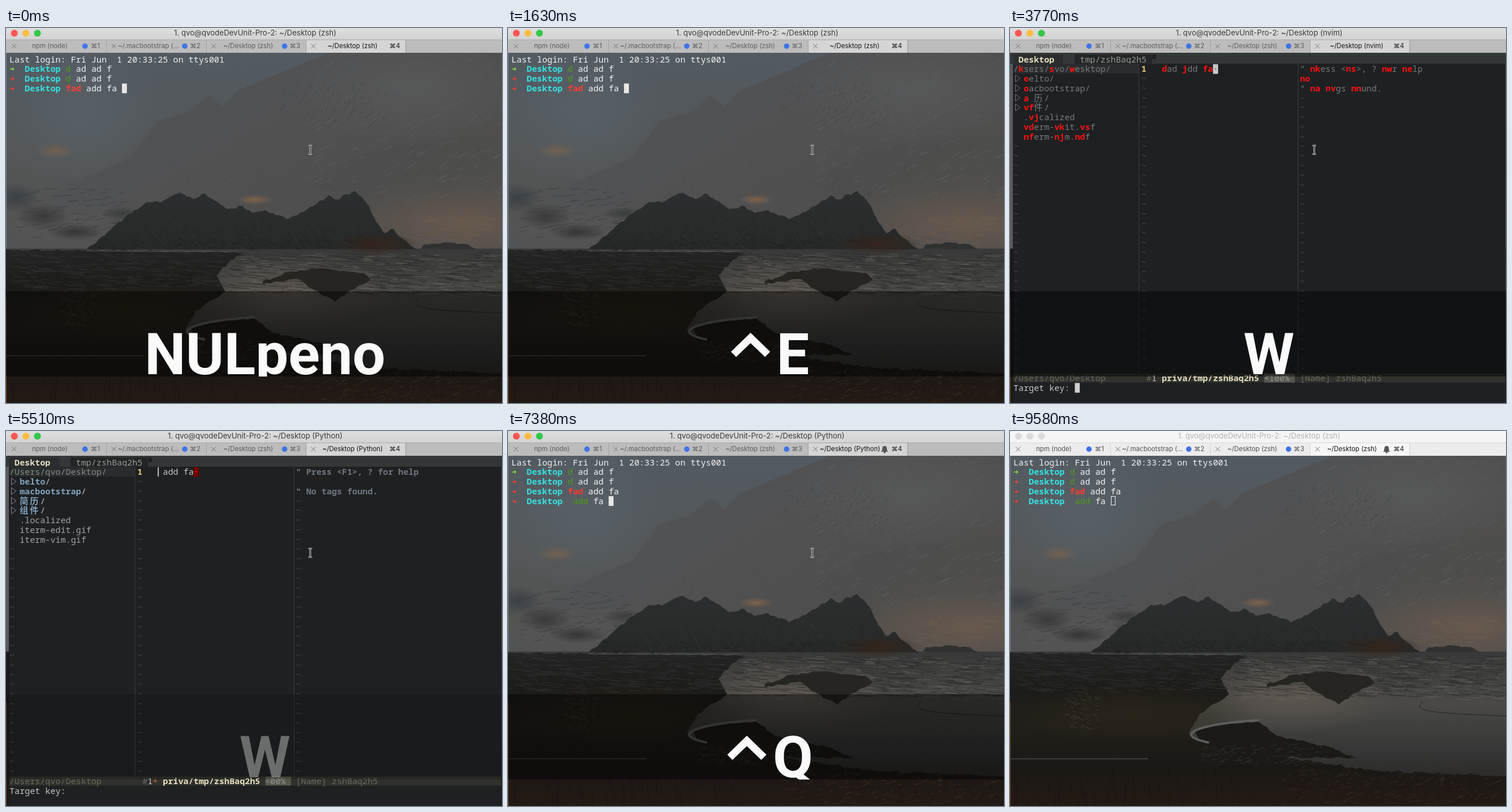
These frames come from a looping animation (860x651 px, 9.68 s). An HTML page with a canvas:

```html
<!DOCTYPE html>
<html lang="en">
<head>
<meta charset="utf-8">
<title>Terminal session</title>
<style>
html, body { margin: 0; height: 100%; overflow: hidden; background: #1e2022; }
canvas { display: block; }
</style>
</head>
<body>
<canvas id="stage" width="860" height="651"></canvas>
<script>
const W = 860, H = 651, LOOP = 9680, CELL = 8.87, ROW = 16.77;
const MONO = '"Noto Sans Mono","Noto Sans CJK SC","DejaVu Sans Mono",monospace';
const UI = 'Inter,"DejaVu Sans",sans-serif';
const USER = 'qvo', HOST = USER + 'deDevUnit-Pro-2';
const g = document.getElementById('stage').getContext('2d');

// Colour codes used after § in terminal strings; capitals are bold.
const INK = {
  w: '#f2f2f2', C: '#34e2e2', g: '#4e9a1a', G: '#8ae234', R: '#ff3b30', E: '#ff1010',
  d: '#777b7b', D: '#707880', B: '#81a2be', f: '#a2a6a4', t: '#c5c8c6', m: '#434649',
  Y: '#f0c674', s: '#6a6a60', S: '#e4dfc0', p: '#888c88', o: '#e06c4c', n: '#969a94'
};
const colX = c => 6 + c * CELL, rowY = r => 54.5 + r * ROW;

function box(x, y, w, h, color, ctx = g) {
  ctx.fillStyle = color;
  ctx.fillRect(x, y, w, h);
}
function cells(col, row, count, color) {
  box(colX(col), rowY(row) - 8.4, count * CELL, 16.8, color);
}
function label(str, x, y, size, color, weight = 400, align = 'center') {
  g.font = `${weight} ${size}px ${UI}`;
  g.textAlign = align;
  g.textBaseline = 'middle';
  g.fillStyle = color;
  g.fillText(str, x, y);
}
function term(col, row, str) {
  g.textAlign = 'left';
  g.textBaseline = 'alphabetic';
  for (const part of str.split('§').slice(1)) {
    const code = part[0], bold = code < 'a';
    g.fillStyle = INK[code];
    g.font = `${bold ? 700 : 500} 14.78px ${MONO}`;
    for (const ch of part.slice(1)) {
      g.fillText(ch, colX(col), rowY(row) + 5);
      col += ch > '\u2fff' ? 2 : 1;
    }
  }
}

function paintScenery() {
  const canvas = document.createElement('canvas');
  canvas.width = W; canvas.height = H;
  const c = canvas.getContext('2d');
  let seed = 7;
  const rnd = () => (seed = (seed * 16807) % 2147483647) / 2147483647;

  const gradient = (x0, y0, x1, y1, ...stops) => {
    const lg = c.createLinearGradient(x0, y0, x1, y1);
    stops.forEach((s, i) => lg.addColorStop(i / (stops.length - 1), s));
    return lg;
  };
  const land = (pts, fill, rough = 3) => {
    c.fillStyle = fill;
    c.beginPath();
    for (let i = 0; i < pts.length - 2; i += 2) {
      const [x, y, u, v] = pts.slice(i, i + 4), n = Math.ceil(Math.hypot(u - x, v - y) / 7);
      for (let k = 0; k < n; k++)
        c.lineTo(x + (u - x) * k / n, y + (v - y) * k / n + (k ? (rnd() - .5) * rough : 0));
    }
    c.lineTo(...pts.slice(-2));
    c.fill();
  };
  const glow = (x, y, rx, ry, color) => {
    c.save();
    c.translate(x, y);
    c.scale(rx, ry);
    const rg = c.createRadialGradient(0, 0, 0, 0, 0, 1);
    rg.addColorStop(0, color);
    rg.addColorStop(1, color.slice(0, 7) + '00');
    c.fillStyle = rg;
    c.fillRect(-1, -1, 2, 2);
    c.restore();
  };
  const flecks = (n, x, y, w, h, len, slope, color) => {
    c.strokeStyle = color;
    c.lineWidth = 1.2;
    c.beginPath();
    while (n--) {
      const px = x + rnd() * w, py = y + rnd() * h, l = len * (.3 + rnd());
      c.moveTo(px, py);
      c.lineTo(px + l, py + l * slope);
    }
    c.stroke();
  };

  box(0, 0, W, H, gradient(0, 43, 0, 390, '#535b61', '#545657', '#504f4d'), c);
  glow(130, 150, 150, 130, '#5a656d99');
  land([0, 345, 60, 305, 110, 270, 215, 225, 262, 162, 312, 148, 352, 117, 375, 136, 402, 108,
        480, 76, 560, 43, 860, 43, 860, 385, 0, 385], gradient(300, 60, 500, 380, '#505355', '#515152', '#4f4e4d'));
  glow(90, 345, 150, 50, '#5c5a5880');
  glow(700, 110, 220, 90, '#5b5d5e90');
  glow(800, 340, 210, 65, '#68594d');
  land([520, 270, 620, 215, 740, 192, 860, 183, 860, 250, 720, 262, 600, 300], '#4c4c4d90');
  flecks(110, 470, 100, 190, 75, 4, -1.3, '#414446a0');
  flecks(160, 520, 60, 340, 250, 14, -.55, '#5e6060a0');
  flecks(60, 280, 235, 170, 60, 4, -1.5, '#46494b90');
  flecks(70, 700, 320, 160, 55, 12, .08, '#70604f90');
  glow(85, 213, 35, 13, '#72604f');
  glow(430, 298, 30, 9, '#80634a');
  glow(18, 295, 40, 26, '#3b4045');
  glow(65, 327, 48, 24, '#3a3a39');
  glow(120, 354, 50, 15, '#343534');
  glow(200, 322, 36, 12, '#3b3c3c');
  flecks(100, 15, 280, 200, 85, 15, -.15, '#3a3c3ca0');

  // Sea and shore
  box(0, 383, W, H - 383, gradient(0, 383, 0, H, '#383938', '#4a4946', '#343534', '#231d19'), c);
  glow(490, 460, 180, 65, '#5d5650');
  flecks(300, 380, 390, 480, 70, 28, .08, '#25262690');
  flecks(160, 400, 392, 460, 75, 24, .05, '#65635ea0');
  land([720, 383, 725, 375, 765, 372, 795, 375, 820, 384], '#303131');
  land([140, 384, 166, 362, 206, 329, 245, 302, 267, 303, 303, 286, 325, 297, 345, 288, 382, 314,
        410, 309, 427, 321, 450, 316, 487, 332, 522, 315, 560, 290, 573, 298, 605, 283, 626, 305,
        645, 340, 656, 356, 672, 349, 685, 364, 712, 384], gradient(0, 285, 0, 385, '#2c2e2f', '#262828'), 5);
  flecks(150, 225, 325, 400, 55, 9, 1.1, '#35383980');
  glow(640, 375, 75, 20, '#34251c');
  flecks(110, 160, 365, 480, 18, 8, .4, '#1d1f1fa0');
  land([0, 385, 180, 386, 410, 389, 385, 408, 365, 430, 380, 457, 330, 490, 310, 525, 360, 548,
        500, 570, 640, 590, 860, 600, 860, 651, 0, 651],
    gradient(0, 385, 0, 651, '#232423', '#1c1c1a', '#211f1a', '#1a1815', '#241a15'), 5);
  flecks(260, 0, 388, 370, 65, 22, .07, '#34363690');
  glow(210, 490, 230, 52, '#302818a0');
  land([445, 440, 490, 423, 550, 417, 620, 425, 632, 437, 598, 455, 570, 475, 535, 455, 505, 435, 445, 445], '#262522', 4);
  land([320, 520, 350, 510, 430, 504, 465, 530, 560, 550, 600, 568, 400, 565, 330, 540], '#1b1a18', 4);
  c.strokeStyle = '#5d5e5b';
  c.lineWidth = 4;
  c.beginPath();
  c.moveTo(345, 541);
  c.bezierCurveTo(270, 525, 345, 507, 432, 502);
  c.stroke();
  c.lineWidth = 1;
  c.beginPath();
  c.moveTo(140, 387); c.lineTo(400, 388);
  c.moveTo(0, 569); c.lineTo(240, 569);
  c.stroke();
  c.strokeStyle = '#242523';
  c.beginPath();
  c.moveTo(860, 495);
  c.bezierCurveTo(760, 490, 690, 490, 716, 470);
  c.stroke();
  flecks(60, 90, 455, 60, 60, 8, .5, '#4a474070');
  flecks(120, 330, 545, 220, 35, 8, -.3, '#35383990');
  flecks(240, 470, 570, 390, 80, 8, -.4, '#40352c80');
  flecks(60, 0, 575, 400, 70, 2, 16, '#171310a0');
  box(0, 43, 1, 340, '#6f7c84', c);
  box(0, 470, 1, 181, '#804018', c);
  return canvas;
}
const scenery = paintScenery();

function drawChrome(t) {
  const idle = t >= 9580, bell = t >= 7380;
  const app = t < 2280 || t >= 7950 ? 'zsh' : t < 5160 ? 'nvim' : 'Python';
  const dim = idle ? '#505050' : '#5d5d5d';
  const bar = g.createLinearGradient(0, 0, 0, 20);
  bar.addColorStop(0, idle ? '#f7f7f7' : '#dedede');
  bar.addColorStop(1, idle ? '#f4f4f4' : '#d2d2d2');
  box(0, 0, W, 20, bar);
  ['#fc5753', '#fdbc40', '#33c748'].forEach((color, i) => dot(14.5 + 20 * i, 9, 6, idle ? '#dcdcdc' : color));
  label(`1. ${USER}@${HOST}: ~/Desktop (${app})`, 432, 9.5, 13, idle ? '#b4b4b4' : '#3a3a3a');

  box(0, 20, W, 23, idle ? '#ececec' : '#bcbcbc');
  box(520, 20, 172, 23, idle ? '#f6f6f6' : '#d5d5d5');
  box(0, 20, W, 1, idle ? '#d8d8d8' : '#a9a9a9');
  const names = ['npm (node)', '~/.macbootstrap (…', '~/Desktop (zsh)', `~/Desktop (${app})`];
  const centers = [76, 247, 420, bell ? 593 : 601];
  names.forEach((name, i) => {
    const x = 173 * i, active = i === 3, color = active ? '#151515' : dim;
    box(x + 174, 21, 1, 22, idle ? '#d4d4d4' : '#a2a2a2');
    g.strokeStyle = '#707070';
    g.lineWidth = 1;
    g.beginPath();
    g.moveTo(x + 10, 27.5); g.lineTo(x + 18, 35.5);
    g.moveTo(x + 18, 27.5); g.lineTo(x + 10, 35.5);
    g.stroke();
    label(name, centers[i], 32, 11.3, color);
    label('⌘' + (i + 1), x + 155, 32, 11.3, color);
    if (!active) dot(x + 137, 31.5, 4.7, '#3f73e6');
  });
  if (bell) {
    g.fillStyle = '#555';
    g.beginPath();
    g.moveTo(647, 36);
    g.bezierCurveTo(651, 32, 647, 26, 653, 26);
    g.bezierCurveTo(659, 26, 655, 32, 659, 36);
    g.fill();
    dot(653, 37, 1.8, '#555');
  }
}
function dot(x, y, r, color) {
  g.fillStyle = color;
  g.beginPath();
  g.arc(x, y, r, 0, 7);
  g.fill();
}

function drawShell(t) {
  g.drawImage(scenery, 0, 0);
  term(0, 0, '§wLast login: Fri Jun  1 20:33:25 on ttys001');
  term(0, 1, '§G➜  §CDesktop §gd §wad ad f');
  term(0, 2, '§R➜  §CDesktop §gd §wad ad f');
  term(0, 3, '§R➜  §CDesktop §Rfad §wadd fa');
  const back = t >= 7380;
  if (back) term(0, 4, '§R➜  §CDesktop  §gadd §wfa');
  if (t >= 9580) {
    g.strokeStyle = '#f2f2f2';
    g.lineWidth = 1;
    g.strokeRect(175.5, 113.5, 7, 15);
  } else cells(back ? 19 : 22, back ? 4 : 3, .95, '#e8e8e8');
}

function drawEditor(t) {
  const picking = t >= 3680 && t < 4510, cut = t >= 4980;
  const inserting = cut && t < 5900, dirty = t >= 5240 && t < 6550;
  g.drawImage(scenery, 0, 0);
  box(0, 62, 6, 320, '#585a5a');
  box(5, 62, W - 6, 589, '#1e2022');
  box(1, 383, 5, 268, '#1b1a18');
  box(0, 43, W, 19, '#343737');
  if (t < 1960) {
    box(5, 43, W - 6, 19, '#1e2022');
    return;
  }
  box(6, 46, 86, 16, '#2b2d2e');
  box(112, 46, 134, 16, '#232526');
  box(247, 46, 6, 8, '#1e2022');
  term(1, 0, '§SDesktop');
  term(13, 0, '§ntmp/zshBaq2h5');

  // File tree
  box(6, 62, 217, 17, '#2a2d2e');
  const tree = picking
    ? ['§Ee§delto/', '§Eo§dacbootstrap/', '§Ea§d 历/', '§Evf§d件/', '§d.§Evj§dcalized',
       '§Evd§derm-§Evk§dit.§Evs§df', '§Enf§derm-§Enj§dm.§End§df']
    : ['§Bbelto§t/', '§Bmacbootstrap§t/', '§B简历§t/', '§B组件§t/',
       '§f.localized', '§fiterm-edit.gif', '§fiterm-vim.gif'];
  term(0, 1, picking ? '§d/§Ek§dsers/§Es§dvo/§Ew§desktop/' : `§p/Users/${USER}/Desktop/`);
  tree.forEach((line, i) => {
    term(2, i + 2, line);
    if (i > 3) return;
    const y = rowY(i + 2) - .5;
    g.strokeStyle = picking ? '#777' : '#9a7f9f';
    g.lineWidth = 1;
    g.beginPath();
    g.moveTo(9.5, y - 6); g.lineTo(17.5, y); g.lineTo(9.5, y + 6);
    g.closePath();
    g.stroke();
  });
  for (let r = 2; r < 33; r++) {
    if (r > 8) term(0, r, '§m~');
    term(25, r, '§m~');
    if (r > 3 && t >= 2140) term(56, r, '§m~');
  }
  box(223, 62, 1, 538, '#3a3d3f');
  box(499, 62, 1, 538, '#3a3d3f');

  // Buffer
  if (!picking && !inserting) cells(26, 1, 29, '#2a2c2d');
  term(25, 1, '§Y1');
  const cursor = t < 4510 ? 39 : 29, tail = cut ? 36 : 39;
  if (cursor !== tail) cells(tail, 1, 1, '#7a0000');
  if (inserting) box(colX(29), 63, 1.5, 16, '#eee');
  else cells(cursor, 1, 1, '#c5c8c6');
  term(29, 1, picking ? '§Ed§dad §Ej§ddd §Efa' : cut ? '§t add fa' : '§tfad add fa');
  term(tail, 1, cursor === tail ? '§m·' : '§E·');

  // Tag list
  if (t >= 2140) {
    const tags = picking
      ? ['§d" §Enk§dess <§Ens§d>, ? §Enw§dr §Ene§dlp', '§Eno', '§d" §Ena§d §Env§dgs §Enn§dund.']
      : ['§D" Press <F1>, ? for help', '§D', '§D" No tags found.'];
    tags.forEach((line, i) => term(56, i + 1, line));
  }

  // Status and command lines
  box(6, 600, W - 7, 15.5, '#30312c');
  term(0, 33, `§s/Users/${USER}/Desktop`);
  term(26, 33, dirty ? '§s#§t1§o+' : '§s#§t1');
  const shift = dirty ? 1 : 0;
  box(colX(49 + shift), 600, 494 - colX(49 + shift), 15.5, '#55564c');
  term(29 + shift, 33, '§Spriva/tmp/zshBaq2h5');
  term(49 + shift, 33, dirty ? '§n<00%' : '§n<100%');
  if (t >= 3120) term(56, 33, '§s[Name] zshBaq2h5');
  if (t >= 6550) term(0, 34, '§t"/private/tmp/zshBaq2h5" 1L, 9C [w]');
  else if (t >= 3680) term(0, 34, '§tTarget key:');
  if (picking) cells(12, 34, .95, '#d0d0d0');
}

// [start, keys, strength]
const FADED = .37;
const captions = [
  [0, 'NULpeno', 1], [420, 'NULpeno', FADED], [530, ''],
  [1220, '^', FADED], [1310, '^', 1], [1400, '^X', 1], [1490, '^', 1], [1630, '^E', 1],
  [2490, '^', 1], [2580, '^', FADED], [2670, ''],
  [3590, 'W', FADED], [3680, 'W', 1], [4160, 'W', FADED], [4250, ''],
  [4420, 'D', FADED], [4510, 'D', 1], [4810, 'C', 1], [4980, 'W', 1], [5510, 'W', FADED], [5600, ''],
  [5810, '⎋', FADED], [5900, '⎋', 1], [6160, '^', 1], [6400, '^S', 1], [6850, '^', 1],
  [7300, '^Q', 1], [7710, '^', 1], [7950, '^', FADED], [8040, '']
];
function drawCaption(t) {
  const [, keys, strength] = captions.findLast(c => c[0] <= t);
  if (!keys) return;
  g.save();
  g.beginPath();
  g.rect(0, 457, W, 148);
  g.clip();
  box(0, 457, W, 148, `rgba(0,0,0,${.45 * strength})`);
  g.globalAlpha = strength;
  g.font = '700 101px Roboto,"DejaVu Sans",sans-serif';
  g.textAlign = 'left';
  g.textBaseline = 'alphabetic';
  g.fillStyle = '#fafafa';
  const control = keys[0] === '^', text = control ? keys.slice(1) : keys, lead = control ? 90 : 0;
  const x = 449 - (lead + g.measureText(text).width) / 2;
  g.fillText(text, x + lead, 601);
  if (control) {
    g.translate(x + 45, 529);
    g.fill(new Path2D('M0 0L34 33L25 42L0 18L-25 42L-34 33Z'));
  }
  g.restore();
}

function drawPointer(t) {
  if (t >= 8930 && t < 9210) {
    const k = Math.floor((t - 8930) / 70);
    g.save();
    g.translate(849 + k * 2, 634 + k * 3);
    g.strokeStyle = '#111';
    g.fillStyle = '#fff';
    const arrow = new Path2D('M0 0h6l-2 2l6 6l2-2v6h-6l2-2l-6-6l-2 2z');
    g.stroke(arrow);
    g.fill(arrow);
    g.restore();
    return;
  }
  if (t >= 8600) return;
  const [x, y] = t < 8420 ? [527.5, 211.5] : t < 8510 ? [545.5, 225.5] : [755.5, 370.5];
  const beam = new Path2D(`M${x - 3} ${y - 7.5}q3 0 3 3v9q0 3 -3 3m6 0q-3 0 -3 -3v-9q0 -3 3 -3`);
  g.strokeStyle = '#e8e8e8';
  g.lineWidth = 2.6;
  g.stroke(beam);
  g.strokeStyle = '#151515';
  g.lineWidth = 1;
  g.stroke(beam);
}

function frame(now) {
  const t = now % LOOP;
  (t >= 1720 && t < 7380 ? drawEditor : drawShell)(t);
  drawChrome(t);
  drawCaption(t);
  drawPointer(t);
  requestAnimationFrame(frame);
}
requestAnimationFrame(frame);
</script>
</body>
</html>
```
